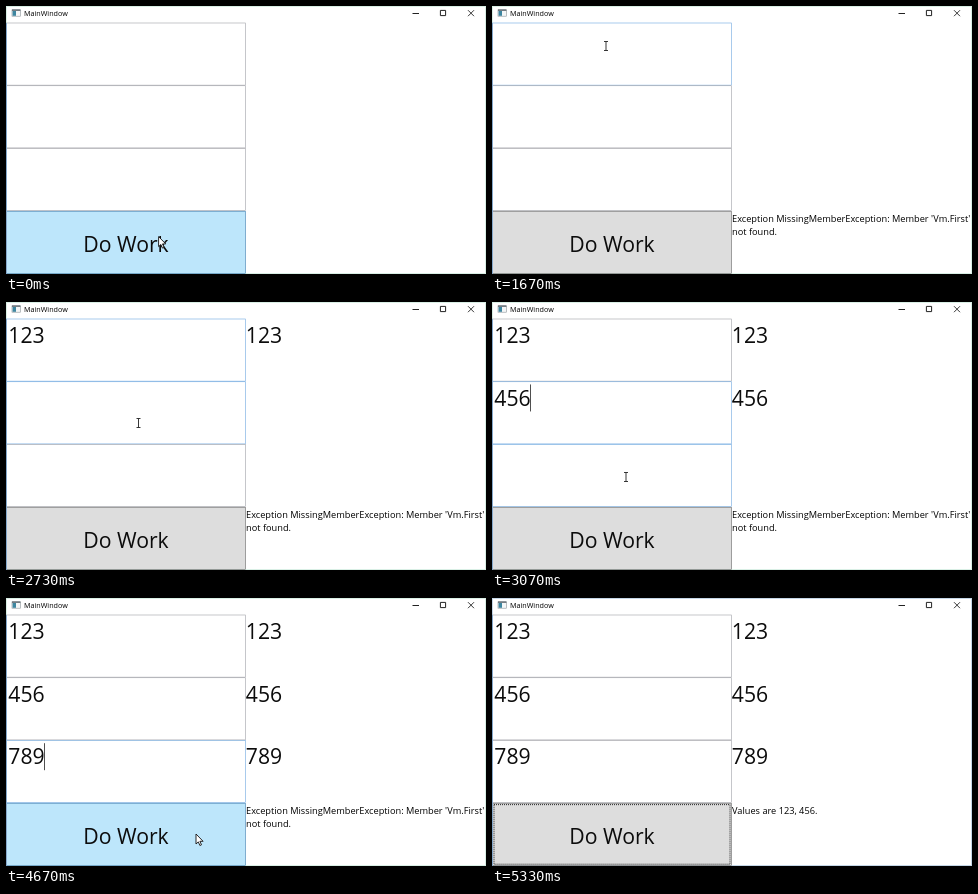
Animation, 480 px wide and 268 px high, one loop 5.99 s. Source, as an HTML page:

```html
<!DOCTYPE html>
<html lang="en">
<head>
<meta charset="utf-8">
<style>
  html, body { margin: 0; width: 100%; height: 100%; overflow: hidden; background: #fff; }
  svg { display: block; width: 480px; height: 268px; font-family: "Open Sans", "Noto Sans", sans-serif; fill: #0c0c0c; }
  .big { font-size: 21.2px; }
  .small { font-size: 9.23px; fill: #000; }
  .title { font-size: 7.2px; fill: #000; }
  .line { fill: none; stroke: #222; }
</style>
</head>
<body>
<svg id="stage" viewBox="0 0 480 268"></svg>
<script>
const LOOP = 5990, TOP = 16.7, ROW = 62.75, THIN = .6;
const GREY = '#a0a1a7', BLUE = '#6fa8e0';
const values = ['123', '456', '789'];
const error = ["Exception MissingMemberException: Member 'Vm.First'", 'not found.'];

// active: boxes with a blue border, filled: boxes with text, caret: box with the text caret
const states = [
  { from: 0, active: [], filled: 0, button: 'hover', pointer: [152.6, 230.6] },
  { from: 1000, active: [0], filled: 0, output: error, beam: [114, 40] },
  { from: 1870, active: [0, 1], filled: 1, output: error, beam: [132.5, 121] },
  { from: 3000, active: [1, 2], filled: 2, output: error, beam: [134, 175], caret: 1 },
  { from: 4000, active: [2], filled: 3, output: error, button: 'hover', pointer: [190, 236], caret: 2 },
  { from: 5000, active: [], filled: 3, output: ['Values are 123, 456.'], button: 'focus' }
];

const rowY = i => TOP + ROW * i;
const rect = (x, y, w, h, fill, stroke = 'none', width = 1) =>
  `<rect x="${x}" y="${y}" width="${w}" height="${h}" fill="${fill}" stroke="${stroke}" stroke-width="${width}"/>`;
const text = (x, y, size, s, anchor = 'start') =>
  `<text x="${x}" y="${y}" class="${size}" text-anchor="${anchor}">${s}</text>`;
const line = (d, more = '') => `<path class="line" d="${d}" ${more}/>`;

function titleBar() {
  return rect(6, 3.8, 8.4, 6.4, '#f4f6f7', '#8b9499', THIN) + rect(6, 3.5, 8.4, 1.3, '#59636a') +
    rect(6.6, 5, 3.4, 4.8, '#3d86a0') + text(18, 9.8, 'title', 'MainWindow') +
    line('M406.5 7.5h6.5M434.4 4.4h5.2v5.2h-5.2z') + line('M462 4.2l6 6m0-6l-6 6', 'stroke-width=".9"');
}

// Each box has its own thin border, so neighbours add up to a stronger line.
const frame = (i, fill, color) => rect(.4, rowY(i) + THIN / 2, 239, ROW - THIN, fill, color, THIN);

function boxes({ active, filled, caret }) {
  let out = values.map((_, i) => frame(i, 'none', active.includes(i) ? BLUE : GREY)).join('');
  values.slice(0, filled).forEach((v, i) => {
    const y = rowY(i) + 24.2;
    out += text(2.3, y, 'big', v) + text(239.8, y, 'big', v);
  });
  if (caret !== undefined) out += line(`M38.5 ${rowY(caret) + 3}v27`, 'stroke-width=".8"');
  return out;
}

function button({ button: mode }) {
  const hover = mode === 'hover';
  let out = frame(3, hover ? '#bde6fb' : '#dddddd', hover ? '#3c7fb1' : '#666');
  if (mode === 'focus') {
    out += `<rect x="2" y="${rowY(3) + 1.7}" width="236" height="${ROW - 3.2}" class="line" stroke-dasharray="1 1"/>`;
  }
  return out + text(120, 245.7, 'big', 'Do Work', 'middle');
}

function cursor({ pointer, beam }) {
  if (pointer) {
    return `<path transform="translate(${pointer})" d="M0 0v10l2.3-2.1 1.6 3.6 1.6-.7-1.6-3.5h3.2z" fill="#fff" stroke="#111" stroke-width=".9"/>`;
  }
  return beam ? line('M-2 -4.5h4M0 -4.5v9M-2 4.5h4', `transform="translate(${beam})" stroke-width=".9"`) : '';
}

function draw(s) {
  const output = (s.output || []).map((t, i) => text(240, 215.8 + 13 * i, 'small', t)).join('');
  const edge = s.button === 'focus' ? '#c4d6e6' : '#d9efe5';
  return rect(0, 0, 480, 268, '#fff') + rect(.5, .5, 479, 267, 'none', edge) +
    titleBar() + boxes(s) + button(s) + output +
    line('M.5 17V268', 'style="stroke:#86a9cc"') + cursor(s);
}

const stage = document.getElementById('stage');
let shown;
function tick() {
  const t = performance.now() % LOOP;
  const state = states.findLast(s => s.from <= t);
  if (state !== shown) stage.innerHTML = draw(shown = state);
  requestAnimationFrame(tick);
}
tick();
</script>
</body>
</html>
```
